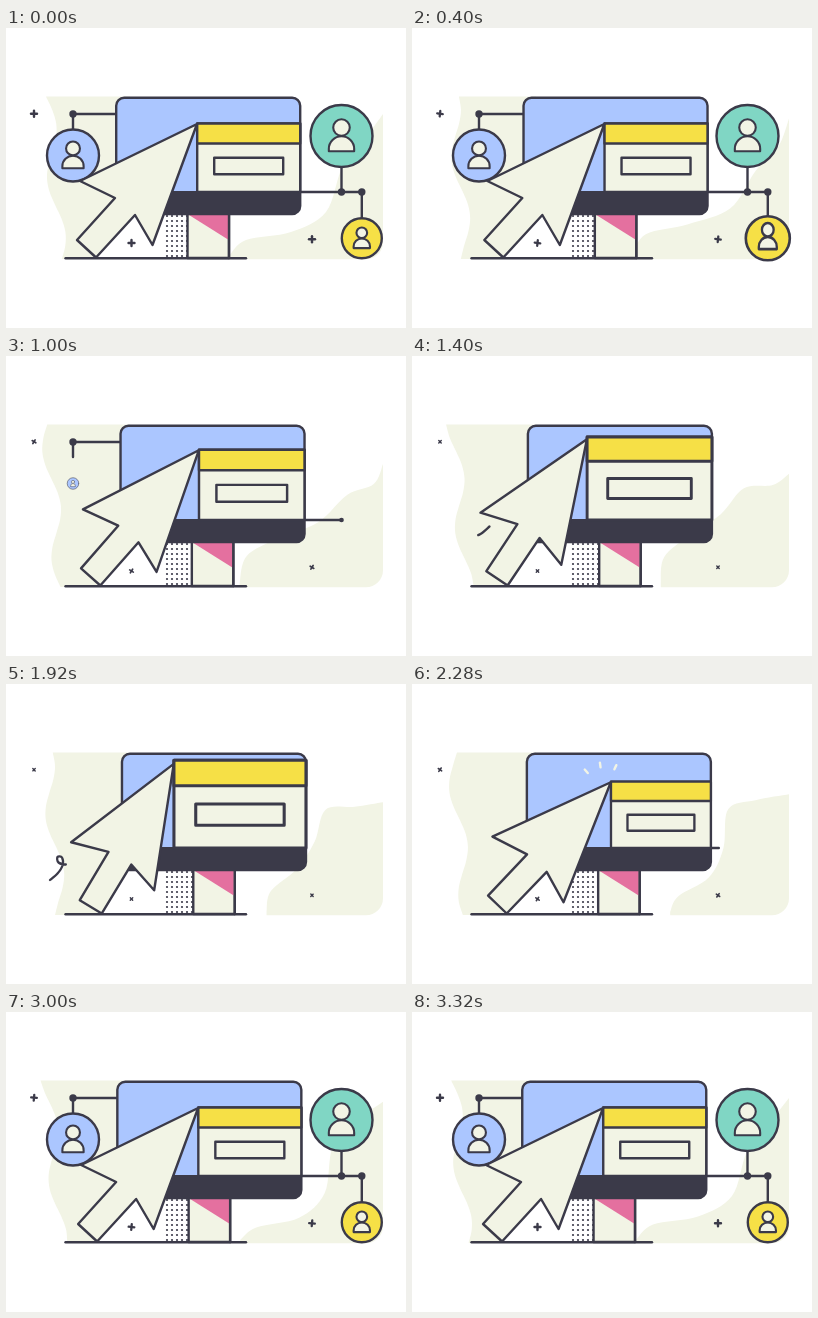
These frames come from a looping animation (400 px wide and 300 px high, 3360 ms). An HTML page with a canvas:

```html
<!DOCTYPE html>
<html lang="en">
<head>
<meta charset="utf-8">
<title>Connected screen</title>
<style>
  html, body { margin: 0; width: 100%; height: 100%; overflow: hidden; background: #fff; }
  canvas { display: block; width: 400px; height: 300px; }
</style>
</head>
<body>
<canvas id="stage"></canvas>
<script>
const LOOP = 3360;
const { PI, sin, cos } = Math;
const INK = '#3b3a49', CREAM = '#f2f4e5', BLUE = '#abc6ff', YELLOW = '#f6e046',
      PINK = '#e4709f', GREEN = '#80d6c4';

const canvas = document.getElementById('stage');
const ratio = window.devicePixelRatio || 1;
canvas.width = 400 * ratio;
canvas.height = 300 * ratio;
const ctx = canvas.getContext('2d');

// Eased value from alternating times and values.
function track(t, ...keys) {
  if (t <= keys[0]) return keys[1];
  for (let i = 2; i < keys.length; i += 2) {
    if (t < keys[i]) {
      const u = (t - keys[i - 2]) / (keys[i] - keys[i - 2]);
      return keys[i - 1] + (keys[i + 1] - keys[i - 1]) * u * u * (3 - 2 * u);
    }
  }
  return keys[keys.length - 1];
}

// 1, fading to 0 at out, returning to 1 at back.
const shown = (t, out, back, time = 100) => track(t, out, 1, out + time, 0, back, 0, back + time, 1);

// The same with a swell before leaving and after returning.
const pop = (t, out, back, peak) => track(t, out, 1, out + 220, peak, out + 420, 0,
                                          back, 0, back + 260, peak, back + 540, 1);

function paint(fill, stroke = INK, width = 2.4) {
  if (fill) { ctx.fillStyle = fill; ctx.fill(); }
  if (stroke) { ctx.strokeStyle = stroke; ctx.lineWidth = width; ctx.stroke(); }
}

function poly(points, close) {
  ctx.beginPath();
  points.forEach(p => ctx.lineTo(...p));
  if (close) ctx.closePath();
}

function line(from, to, part = 1, color = INK) {
  if (part < 0.01) return;
  poly([from, [from[0] + (to[0] - from[0]) * part, from[1] + (to[1] - from[1]) * part]]);
  paint(null, color);
}

function box(x, y, w, h, fill) {
  ctx.beginPath();
  ctx.rect(x, y, w, h);
  paint(fill);
}

function dot(x, y, r) {
  if (r < 0.02) return;
  ctx.beginPath();
  ctx.arc(x, y, r, 0, 2 * PI);
  paint(INK, null);
}

// Smooth curve through points, continuing the current path.
function curve(path, pts) {
  path.lineTo(...pts[0]);
  for (let i = 0; i < pts.length - 1; i++) {
    const b = pts[i], c = pts[i + 1], a = pts[i - 1] || b, d = pts[i + 2] || c;
    path.bezierCurveTo(b[0] + (c[0] - a[0]) / 6, b[1] + (c[1] - a[1]) / 6,
                       c[0] - (d[0] - b[0]) / 6, c[1] - (d[1] - b[1]) / 6, ...c);
  }
}

const SHORE = [[223, 228], [240, 212], [285, 204], [320, 184], [336, 140], [358, 112], [377, 86]];

function backdrop(phase) {
  // Left edge: a wave that climbs twice per loop.
  const climb = 2 * phase - 0.5 * sin(phase);
  const left = Array.from({ length: 13 }, (_, i) => {
    const v = i / 2;
    return [41 + 2.3 * v + 7 * cos((v - 1.1) * PI / 2 + climb), 68.5 + 27.1 * v];
  });
  ctx.beginPath();
  curve(ctx, left);
  [[90, 231], [118, 180], [124, 150], [124, 68.5]].forEach(p => ctx.lineTo(...p));
  paint(CREAM, null);

  // Right edge: the shore sways around its resting line.
  const away = 1 - cos(phase), side = sin(phase);
  const right = SHORE.map(([x, y], i) => {
    const s = i / 6, ripple = sin(2 * PI * s) * side;
    return [x + 17 * (1 - s) * cos(1.5 * PI * s) * away - 15 * ripple - 12 * side * (i === 0),
            y + (17 * s * s - 18 * sin(PI * s) ** 2) * away - 8 * ripple];
  });
  ctx.beginPath();
  ctx.moveTo(right[0][0], 231.3);
  curve(ctx, right);
  ctx.arcTo(377, 231.3, 340, 231.3, 17);
  ctx.closePath();
  paint(CREAM, null);
}

function plus(x, y, phase) {
  const k = (1 - cos(phase)) / 2, s = 1 - 0.45 * k;
  ctx.save();
  ctx.translate(x, y);
  ctx.rotate(k * 0.85);
  ctx.scale(s, s);
  line([-3, 0], [3, 0]);
  line([0, -3], [0, 3]);
  ctx.restore();
}

function avatar(x, y, r, fill, scale) {
  if (scale < 0.01) return;
  const head = r * 0.267, w = head * 1.53;
  ctx.save();
  ctx.translate(x, y);
  ctx.scale(scale, scale);
  ctx.beginPath();
  ctx.arc(0, 0, r, 0, 2 * PI);
  paint(fill);
  // The figure stretches upward while the disc swells.
  ctx.translate(0, r * 0.49);
  ctx.scale(1, Math.max(1, 1.5 * scale - 0.5));
  ctx.beginPath();
  ctx.moveTo(-w, 0);
  ctx.ellipse(0, -head * 0.3, w, head * 1.5, 0, PI, 2 * PI);
  ctx.lineTo(w, 0);
  ctx.closePath();
  paint(CREAM, INK, 2.1);
  ctx.beginPath();
  ctx.arc(0, -head * 2.86, head, 0, 2 * PI);
  paint(CREAM, INK, 2.1);
  ctx.restore();
}

function network(t, shift) {
  const reach = track(t, 560, 356, 700, 335, 1000, 335, 1160, 285, 2200, 285, 2420, 356);
  line([285, 164], [reach, 164]);
  line([335.5, 164], [335.5, 139], shown(t, 880, 2380));
  line([355.8, 164], [355.8, 190], shown(t, 520, 2420));
  line([67, 86], [67, 101], shown(t, 1000, 2440));
  line([112 + shift, 86], [67, 86], shown(t, 1100, 2320, 140));

  dot(335.5, 164, 3.7 * shown(t, 960, 2340));
  dot(355.8, 164, 3.7 * shown(t, 580, 2400, 220));
  dot(67, 86, 3.7 * shown(t, 1060, 2420));

  avatar(67, 127.5, 26, BLUE, pop(t, 640, 2420, 1.06));
  avatar(335.5, 108, 31, GREEN, pop(t, 500, 2300, 1.05));
  avatar(355.8, 210.3, 20, YELLOW, pop(t, 180, 2460, 1.1));
}

function monitor(shift, tip) {
  ctx.save();
  ctx.translate(shift, 0);

  box(181.5, 180, 41.5, 50, CREAM);
  poly([[183, 187], [222, 187], [222, 211.5]], true);
  paint(PINK, null);
  line([223, 180], [223, 230]);

  ctx.beginPath();
  ctx.roundRect(110.2, 69.7, 184, 116.3, 8);
  paint(BLUE);
  ctx.save();
  ctx.clip();
  ctx.fillStyle = INK;
  ctx.fillRect(108, 163, 190, 26);
  ctx.restore();

  // The panel grows from its lower right corner to meet the pointer.
  const s = (294 + shift - tip[0]) / 103;
  ctx.translate(294.2, 164);
  ctx.scale(s, s);
  box(-103, -68.5, 103, 68.5, CREAM);
  box(-103, -68.5, 103, 20, YELLOW);
  box(-86, -34.3, 69, 16.5, CREAM);
  ctx.restore();
}

// Pointer outline around its foot, which is the pivot.
const ARROW = [[101, -134], [-16, -77], [19, -60], [-19, -18], [0, -0.5], [39, -43], [56.5, -13]];

function pointer(t, shift) {
  const a = track(t, 400, 0, 760, -1, 1720, 12, 1880, 12, 2200, -1.5, 2560, 0) * PI / 180;
  const size = 1 - 0.04 * a, c = cos(a) * size, s = sin(a) * size;
  return ARROW.map(([x, y]) => [90 + shift + x * c + y * s, 230 + y * c - x * s]);
}

const squiggle = new Path2D();
curve(squiggle, [[77.5, 170.5], [68.5, 178], [60.5, 180.5], [52.5, 178.5], [51.5, 173],
                 [56, 173.5], [56.5, 181.5], [51.5, 189.5], [44, 196]]);

function scribble(t) {
  const from = track(t, 1740, 0, 2240, 70), to = track(t, 1320, 0, 1600, 70);
  if (to - from < 0.3) return;
  ctx.save();
  ctx.setLineDash([to - from, 200]);
  ctx.lineDashOffset = -from;
  ctx.strokeStyle = INK;
  ctx.lineWidth = 2.3;
  ctx.stroke(squiggle);
  ctx.restore();
}

function sparks(t) {
  const near = track(t, 2120, 10, 2360, 30), far = track(t, 2080, 10, 2300, 30);
  if (far - near < 0.3) return;
  for (let i = -1; i <= 1; i++) {
    const a = 0.57 * i - 1.71, at = r => [192 + r * cos(a), 108 + r * sin(a)];
    line(at(near), at(far), 1, CREAM);
  }
}

function draw(t) {
  ctx.setTransform(ratio, 0, 0, ratio, 0, 0);
  ctx.fillStyle = '#fff';
  ctx.fillRect(0, 0, 400, 300);
  ctx.lineCap = 'round';
  ctx.lineJoin = 'round';

  const phase = 2 * PI * t / LOOP;
  const shift = 6 * sin(phase / 2) ** 1.5;
  const arrow = pointer(t, shift);

  backdrop(phase);
  for (let x = 161; x < 190; x += 5)
    for (let y = 188; y < 230; y += 5) dot(x, y, 1.1);
  network(t, shift);
  monitor(shift, arrow[0]);
  sparks(t);
  line([59.5, 230.2], [240, 230.2]);
  poly(arrow, true);
  paint(CREAM);
  scribble(t);
  plus(28, 85.7, phase);
  plus(125.5, 215, phase);
  plus(306, 211.3, phase);
}

const start = performance.now();
function tick() {
  draw((performance.now() - start) % LOOP);
  requestAnimationFrame(tick);
}
tick();
</script>
</body>
</html>
```
